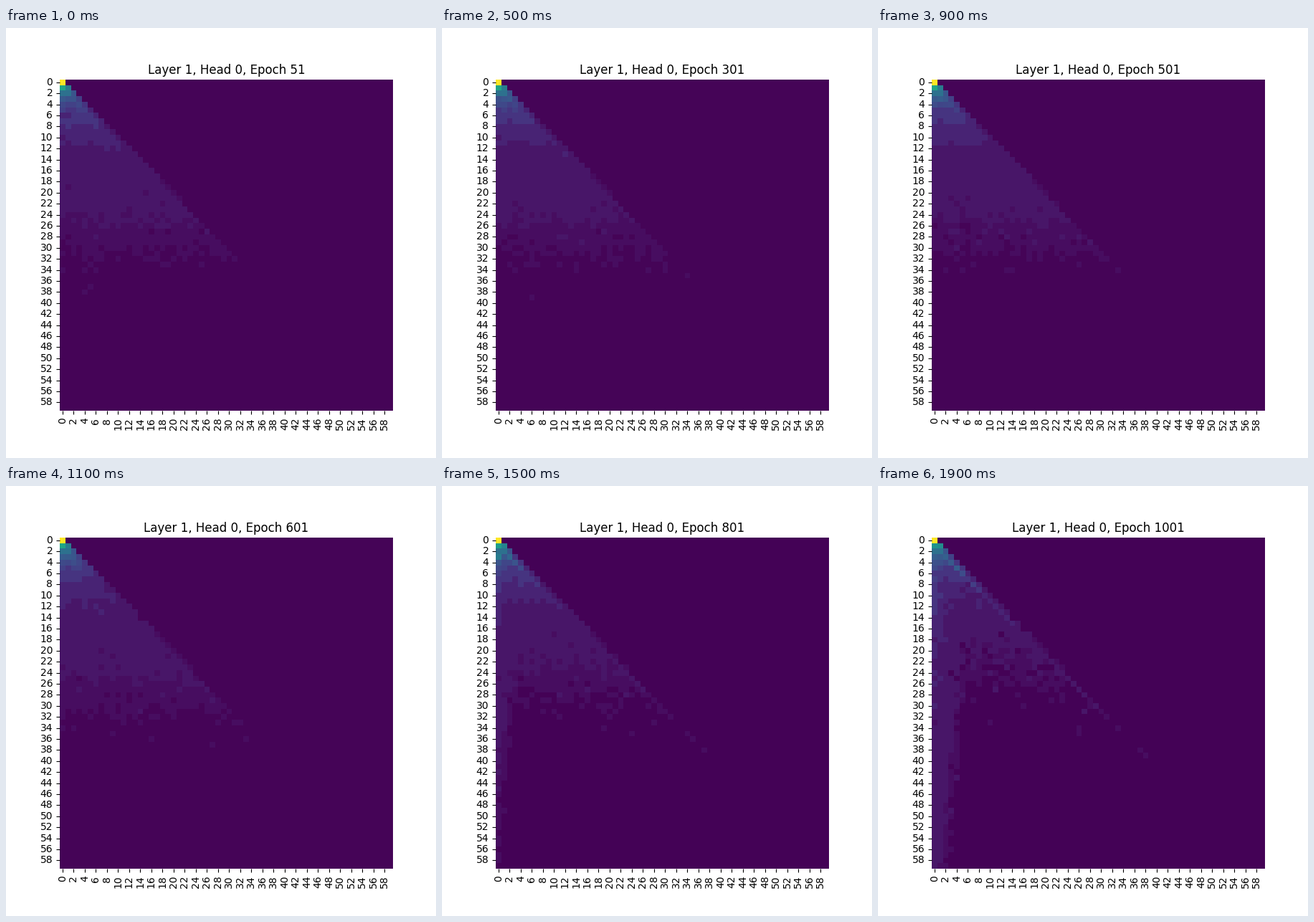
Write a matplotlib script that moves like this. It is 600x600 px and loops after 2000 ms.

```python
import numpy as np
import matplotlib.pyplot as plt
from matplotlib.animation import FuncAnimation

N = 60
FRAMES = 20
INTERVAL = 100
ROW, COL = np.mgrid[0:N, 0:N]

# Low weights fall into a few flat colour steps
BOUNDS = [0.0318, 0.0393, 0.084, 0.127, 0.18]
SHADES = [0.008, 0.035, 0.058, 0.096, 0.15]

plt.rcParams["text.kerning_factor"] = 6


def attention(frame):
    """Causal attention weights: near uniform, later drawn to both edges."""
    rng = np.random.default_rng(400 + frame)
    late = max(0, (frame - 11) / 8) ** 1.2
    gap = ROW - 1 - COL

    # Uniform rows with a weaker self weight
    w = (COL <= ROW).astype(float)
    w[ROW == COL] = 0.7
    w[0, 0] = 1
    w[1, 1] += 0.25 * late
    w /= w.sum(axis=1, keepdims=True)

    w *= np.where((ROW > 20) & (gap >= 0), 1 + 0.06 * np.exp(-np.maximum(gap, 0) / 2), 1)

    # First columns and the previous token gain weight, the interior loses some
    width = 0.5 + 3 * late * np.minimum(1, ROW / 30)
    first = 1 + 1.8 * late * (1 - np.exp(-ROW / 24)) * np.exp(-((COL / width) ** 2))
    fade = np.clip(COL / 6, 0, 1) * np.clip((ROW - 6) / 6, 0, 1)
    inner = np.where(gap > 0, 1 - 0.18 * late * fade, 1)
    previous = np.where(gap == 0, 1 + late * (0.12 + 0.5 * np.exp(-ROW / 12)), 1)
    w *= np.where(ROW >= 3, first * inner * previous, 1)

    noise = rng.laplace(0, 0.05 + 0.04 * late, (N, N))
    noise += rng.normal(0, 0.02, N)
    w *= np.where(ROW >= 3, 1 + noise, 1)
    return np.clip(w, 0, 1)


def shade(w, frame):
    steps = np.array(SHADES)
    if frame > 14:
        steps[0] = 0.005
    level = np.digitize(w, BOUNDS)
    return np.where(level < len(steps), steps[np.minimum(level, len(steps) - 1)], w)


fig, ax = plt.subplots(figsize=(6, 6), dpi=100)
mesh = ax.pcolormesh(np.zeros((N, N)), cmap="viridis", vmin=0, vmax=1)
ax.set(xlim=(0, N), ylim=(N, 0))
ax.spines[:].set_visible(False)

marks = np.arange(0, N, 2)
ax.set_xticks(marks + 0.5, marks, rotation=90)
ax.set_yticks(marks + 0.5, marks, va="center")
title = ax.set_title("")


def draw(frame):
    mesh.set_array(shade(attention(frame), frame))
    title.set_text(f"Layer 1, Head 0, Epoch {51 + 50 * frame}")
    return mesh, title


anim = FuncAnimation(fig, draw, frames=FRAMES, interval=INTERVAL,
                     repeat=True, repeat_delay=0, blit=False)
plt.show()
```
